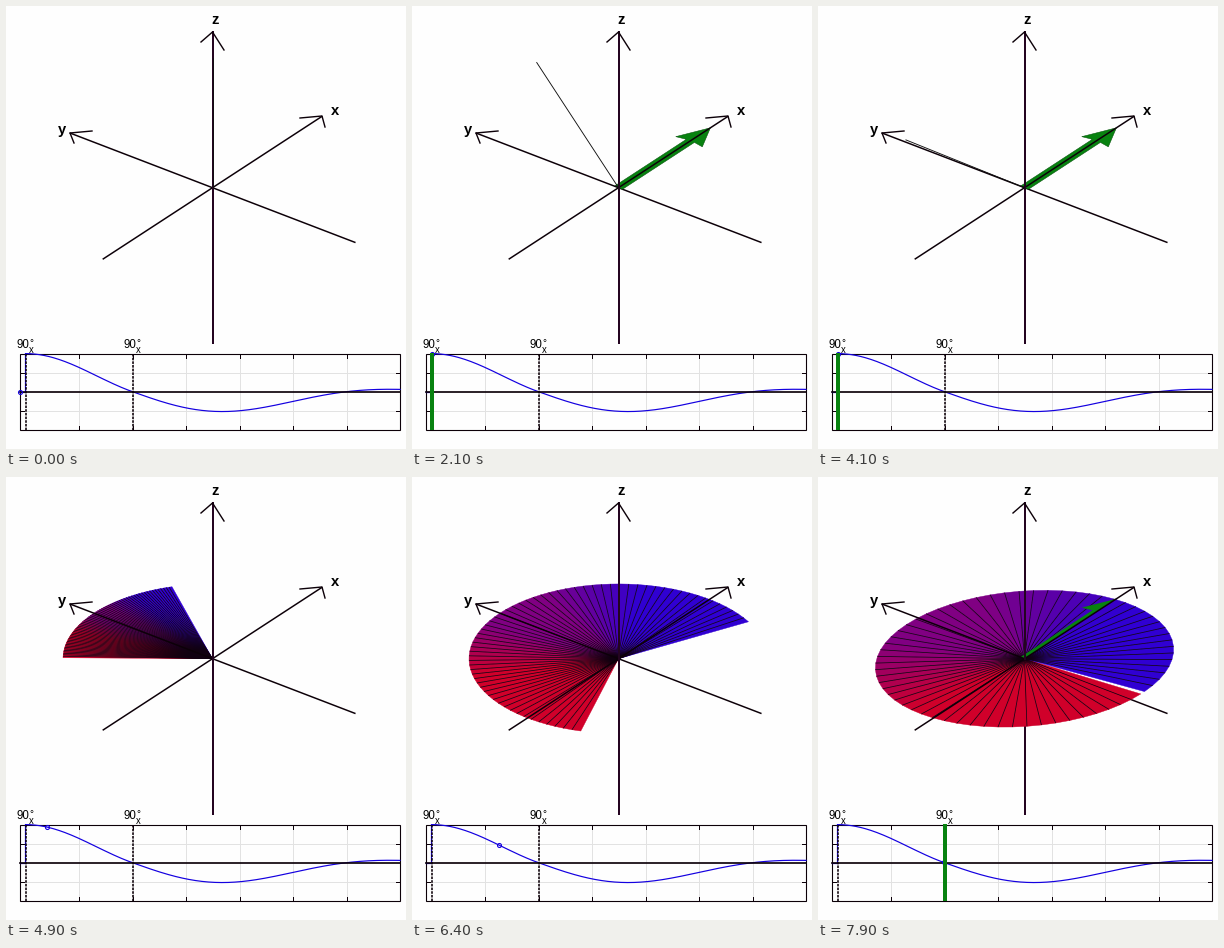
A matplotlib script for the animation above (8000 ms loop, 400 px wide and 443 px high).

```python
import numpy as np
import matplotlib.pyplot as plt
from matplotlib.animation import FuncAnimation
from matplotlib.collections import LineCollection, PolyCollection
from matplotlib.colors import LinearSegmentedColormap
from matplotlib.patches import Polygon, Rectangle

W, H, DPI = 400, 443, 64
PX = 72 / DPI
FRAMES, INTERVAL = 80, 100

INK, GREEN, BLUE = "#0c0008", "#088210", "#1400e0"
ORIGIN = np.array([206.5, 181.7])
RADIUS = 149.5
AZ, EL = np.radians(52.5), np.radians(30)

# Sequence: frame numbers at which each stage begins
PULSE1, FREE, PULSE2 = 2, 42, 77
FLIP_RATE, FLIP_LEAD = 2.27, 0.2
STEP = 3.016

# Signal plot geometry
LEFT, RIGHT, TOP, BASE, BOTTOM = 14, 394, 347.6, 385.7, 423.6
T1, T2 = 19.5, 126.5
TAU = T2 - T1

SPINS = 65
U = np.linspace(0, 1, SPINS)
SPIN_MAP = LinearSegmentedColormap.from_list("spins", [
    (0, "#d0002a"), (0.28, "#d0002a"), (0.46, "#800082"),
    (0.6, "#800082"), (0.78, "#3000d2"), (1, "#3000d2")])


def project(p):
    """Orthographic view of x, y, z points as stage pixels."""
    x, y, z = np.moveaxis(np.asarray(p, float), -1, 0)
    right = x * np.cos(AZ) - y * np.sin(AZ)
    depth = x * np.sin(AZ) + y * np.cos(AZ)
    up = depth * np.sin(EL) + z * np.cos(EL)
    return ORIGIN + RADIUS * np.stack([right, -up], axis=-1)


def signal(x):
    """Decay after the first pulse, echo after the second."""
    s = (np.asarray(x, float) - T1) / TAU
    echo = -0.5 * (np.sinc(s - 2) - np.sinc(s))
    return np.where(s < 0, 0, np.where(s < 1, np.sinc(s), echo))


def to_y(v):
    return BASE - (BASE - TOP) * v


fig = plt.figure(figsize=(W / DPI, H / DPI), dpi=DPI, facecolor="#fefefe")
ax = fig.add_axes([0, 0, 1, 1])
ax.set_xlim(0, W)
ax.set_ylim(H, 0)
ax.axis("off")


def line(pts, width=1.5, color=INK, z=6, **kw):
    xs, ys = np.transpose(pts)
    return ax.plot(xs, ys, color=color, lw=width * PX, zorder=z, **kw)[0]


def label(x, y, s, size, **kw):
    ax.text(x, y, s, fontsize=size * PX, family="Liberation Sans",
            color="black", va="baseline", **kw)


# Coordinate axes; the halves below the disc lie behind it
for axis, back in zip(np.eye(3), (6, 1, 1)):
    width, color = (2, "#240420") if axis[2] else (1.5, INK)
    line(project([0 * axis, 1.2 * axis]), width, color)
    line(project([0 * axis, -1.2 * axis]), width, color, back)

for head in ([(294, 112), (316, 110), (319, 121)],
             [(86, 125), (64, 127), (68, 137)],
             [(195, 36), (206.5, 26), (218, 44)]):
    line(head, 1.4)

for x, y, s in ((328.7, 109.3, "x"), (55.8, 128, "y"), (209.5, 18, "z")):
    label(x, y, s, 14.8, weight="bold", ha="center")

# Signal plot
for i in range(1, 8):
    x = T1 + TAU / 2 * i
    if x < RIGHT:
        line([(x, TOP), (x, BOTTOM)], 1, "#e2e2e2", 1)
        line([(x, TOP), (x, TOP + 4)], 1, z=3)
        line([(x, BOTTOM), (x, BOTTOM - 4)], 1, z=3)
for y in ((TOP + BASE) / 2, (BASE + BOTTOM) / 2):
    line([(LEFT, y), (RIGHT, y)], 1, "#e2e2e2", 1)
    line([(LEFT, y), (LEFT + 4, y)], 1, z=3)
    line([(RIGHT, y), (RIGHT - 4, y)], 1, z=3)
ax.add_patch(Rectangle((LEFT, TOP), RIGHT - LEFT, BOTTOM - TOP, fill=False,
                       ec=INK, lw=1.1 * PX, zorder=3))

xs = np.linspace(T1, RIGHT, 400)
line([(LEFT, BASE), (T1 - 1, BASE), (T1 - 1, TOP)], 1.2, BLUE, 4)
line(np.column_stack([xs, to_y(signal(xs))]), 1.2, BLUE, 4)
line([(LEFT, BASE), (RIGHT, BASE)], 1.7, z=5)
for x in (T1, T2):
    line([(x, TOP), (x, BOTTOM)], 1.6, z=5, ls=(0, (1.6, 0.7)))
    label(x - 8.7, 342, "90", 11.5)
    label(x + 3.5, 340, "°", 10)
    label(x + 3.3, 347, "x", 9.5)

marker, = ax.plot([], [], "o", ms=4 * PX, mfc="none", mec=BLUE,
                  mew=1.1 * PX, zorder=6)
bar = ax.add_patch(Rectangle((0, TOP - 0.5), 4, BOTTOM - TOP + 1.2,
                             fc=GREEN, lw=0, zorder=7))

# Pulse field arrow along x, lying in the transverse plane
edge = np.array([(0, 0.034), (0.79, 0.034), (0.775, 0.112), (1.01, 0)])
half = [(a, b, 0) for a, b in edge]
mirror = [(a, -b, 0) for a, b in edge[::-1]]
arrow = ax.add_patch(Polygon(project(half + mirror), fc=GREEN,
                             ec="#04500a", lw=0.5 * PX, zorder=2))
near = ax.add_patch(Polygon(project([(0, 0, 0)] + half), fc=GREEN,
                            lw=0, zorder=5))

# Spins
vector = line([ORIGIN, ORIGIN], 0.9, "#101010", 7)
fan = PolyCollection([], zorder=3, lw=0.4 * PX)
spokes = LineCollection([], colors="#100010", lw=0.75 * PX, zorder=4)
ax.add_collection(fan, autolim=False)
ax.add_collection(spokes, autolim=False)
face = SPIN_MAP((U[:-1] + U[1:]) / 2)


def time_x(n):
    if n < PULSE1:
        return LEFT + STEP * n
    if n < FREE:
        return T1
    return T1 + STEP * (min(n, PULSE2) - FREE + 0.25)


def flip_angle(n, start):
    return np.radians(FLIP_RATE * (n - start + FLIP_LEAD))


def draw_fan(spread, tilt):
    phase = spread * (1 - 2 * U)
    flat = np.cos(phase)
    rim = project(np.column_stack([-np.sin(phase), flat * np.cos(tilt),
                                   -flat * np.sin(tilt)]))
    fan.set_verts([[ORIGIN, a, b] for a, b in zip(rim, rim[1:])])
    fan.set_facecolor(face)
    fan.set_edgecolor(face)
    spokes.set_segments([[ORIGIN, p] for p in rim[1:-1]])


def update(n):
    first, second = PULSE1 <= n < FREE, n >= PULSE2
    x = time_x(n)
    marker.set_data([x], [float(to_y(signal(x))) if n >= PULSE1 else BASE])

    bar.set_visible(first or second)
    bar.set_x((T2 if second else T1) - 2)
    arrow.set_visible(first or second)
    near.set_visible(second)

    spinning = n >= FREE
    vector.set_visible(not spinning)
    fan.set_visible(spinning)
    spokes.set_visible(spinning)
    if spinning:
        tilt = flip_angle(n, PULSE2) if second else 0
        draw_fan(np.pi * (x - T1) / TAU, tilt)
    else:
        flip = flip_angle(n, PULSE1) if first else 0
        tip = project([0, np.sin(flip), np.cos(flip)])
        vector.set_data(*np.transpose([ORIGIN, tip]))
    return marker, bar, arrow, near, vector, fan, spokes


anim = FuncAnimation(fig, update, frames=FRAMES, interval=INTERVAL,
                     repeat=True, repeat_delay=0, blit=False)
plt.show()
```
